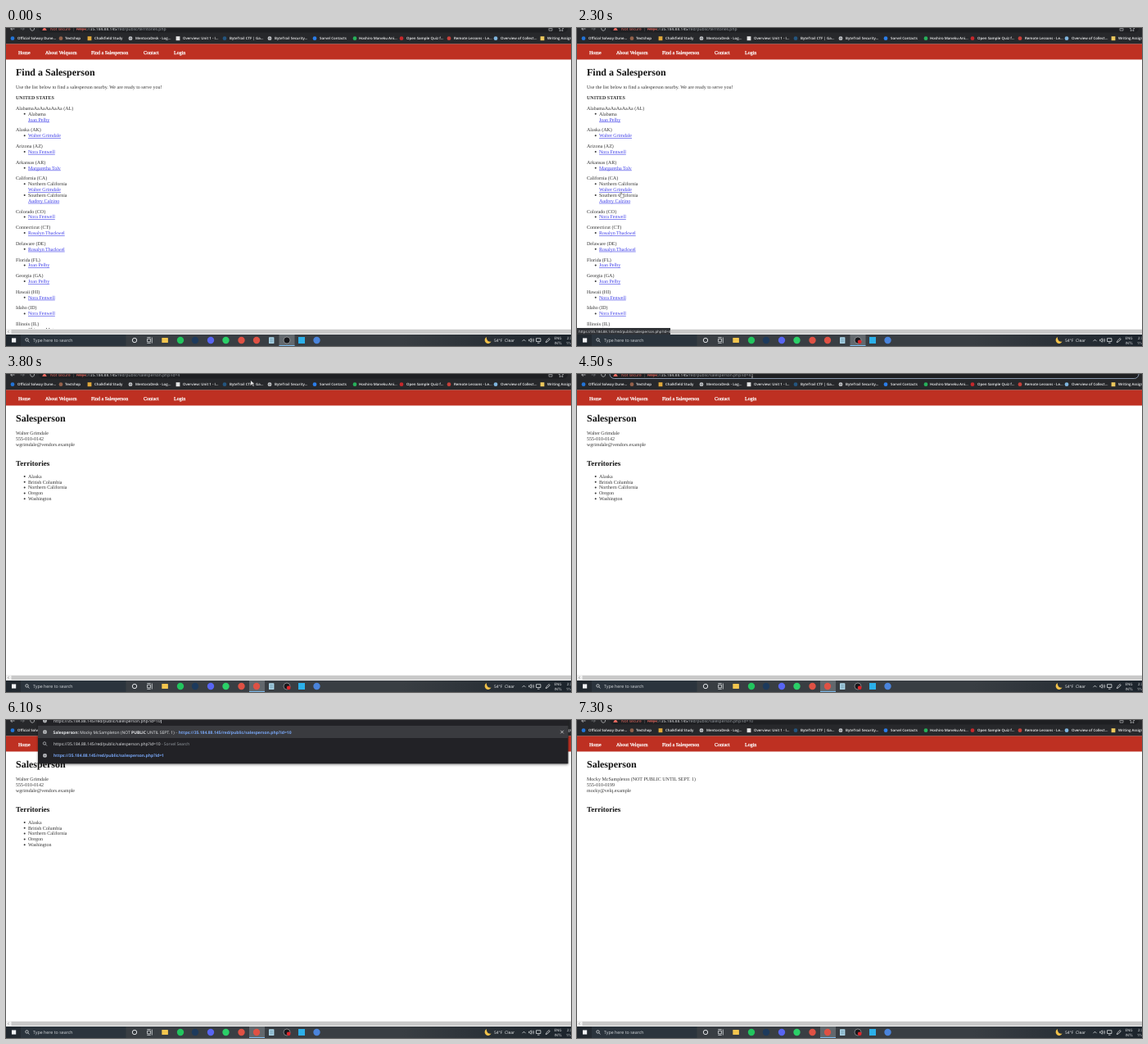
Write an HTML page that moves like this. It is 690 px wide and 388 px high and loops after 8 s.

```html
<!DOCTYPE html>
<html lang="en">
<head>
<meta charset="utf-8">
<title>Browser session</title>
<style>
html, body { margin: 0; width: 100%; height: 100%; overflow: hidden; background: #fff; }
svg { display: block; width: 690px; height: 388px; }
text { font-family: "Open Sans", "Noto Sans", sans-serif; white-space: pre; text-rendering: geometricPrecision; }
.serif text { font-family: "Liberation Serif", "Times New Roman", serif; }
.link { fill: #3c3ce8; text-decoration: underline; text-decoration-thickness: 0.4px; }
.b { font-weight: 700; }
.m { font-weight: 600; }
</style>
</head>
<body>
<svg id="stage" viewBox="0 0 690 388" xmlns="http://www.w3.org/2000/svg"></svg>
<script>
const LOOP = 8000, STEP = 100;
const BASE = '35.184.88.145', PATH = '/red/public/';

const text = (x, y, s, size, fill, cls = '') =>
  `<text x="${x}" y="${y}" font-size="${size}" fill="${fill}" class="${cls}">${s}</text>`;
const rect = (x, y, w, h, fill, extra = '') =>
  `<rect x="${x}" y="${y}" width="${w}" height="${h}" fill="${fill}" ${extra}/>`;
const dot = (x, y, r, fill, extra = '') =>
  `<circle cx="${x}" cy="${y}" r="${r}" fill="${fill}" ${extra}/>`;
const line = (d, color, w = 0.7) =>
  `<path d="${d}" fill="none" stroke="${color}" stroke-width="${w}"/>`;
const group = (id, body, extra = '') => `<g id="${id}" ${extra}>${body}</g>`;
const span = (s, fill, cls = '') => `<tspan fill="${fill}" class="${cls}">${s}</tspan>`;
const globe = (x, y) => dot(x, y, 2.4, '#d5d7da') +
  line(`M${x - 2.2} ${y}h4.4M${x} ${y - 2.2}v4.4`, '#4a4c50', 0.5);
const glass = (x, y, c) => dot(x, y, 1.7, 'none', `stroke="${c}" stroke-width=".7"`) +
  line(`M${x + 1.2} ${y + 1.2}l1.8 1.8`, c);

// Web pages
const INK = '#333', LH = 6.83;
const para = (x, y, s, cls) => text(x, y, s, 6, INK, cls);
const item = (y, s) => dot(22.7, y - 1.9, 1, INK) + para(27, y, s);

const JOAN = 'Joan Pelby', WALTER = 'Walter Grimdale', NORA = 'Nora Fenwell',
  ROSALYN = 'Rosalyn Thackwel';
const states = [
  ['AlabamaAaAaAaAaAa (AL)', 'Alabama', JOAN],
  ['Alaska (AK)', WALTER], ['Arizona (AZ)', NORA], ['Arkansas (AR)', 'Margaretha Tolv'],
  ['California (CA)', 'Northern California', WALTER, 'Southern California', 'Audrey Calzino'],
  ['Colorado (CO)', NORA], ['Connecticut (CT)', ROSALYN], ['Delaware (DE)', ROSALYN],
  ['Florida (FL)', JOAN], ['Georgia (GA)', JOAN], ['Hawaii (HI)', NORA], ['Idaho (ID)', NORA],
  ['Illinois (IL)', 'Chicago Metro', NORA]
];

function territories() {
  let y = 99.9;
  let out = text(12, 58, 'Find a Salesperson', 12, '#111', 'b') +
    para(12, 74.2, 'Use the list below to find a salesperson nearby. We are ready to serve you!') +
    para(12, 87, 'UNITED STATES', 'b');
  for (const [name, ...rows] of states) {
    out += para(12, y, name);
    rows.forEach((row, i) => {
      y += LH;
      const isLink = rows.length === 1 || i % 2 === 1;
      if (i % 2 === 0) out += dot(22.7, y - 1.9, 1, INK);
      out += para(27, y, row, isLink ? 'link' : '');
    });
    y += LH + 6;
  }
  return out;
}

const person = (lines, areas) =>
  text(12, 58, 'Salesperson', 12, '#111', 'b') +
  lines.map((s, i) => para(12, 74.2 + i * LH, s)).join('') +
  text(12, 111.7, 'Territories', 9, '#111', 'b') +
  areas.map((s, i) => item(126.8 + i * LH, s)).join('');

const nav = rect(0, 19.3, 690, 19.2, '#be3022') +
  [[15, 'Home'], [48, 'About Velquorn'], [104, 'Find a Salesperson'], [168, 'Contact'], [205, 'Login']]
    .map(([x, s]) => `<g stroke="#fff" stroke-width=".25">${text(x, 31.8, s, 6, '#fff')}</g>`).join('');

const scrollbar = rect(0, 367, 690, 7, '#f1f1f1') + rect(6.5, 368, 684, 5, '#c9c9c9') +
  line('M3.8 369l-1.6 1.5l1.6 1.5', '#777', 0.6);

const status = rect(0, 366, 114, 8, '#303236') +
  text(2, 371.6, `https://${BASE}${PATH}salesperson.php?id=4`, 4.4, '#e4e6e9');

// Browser frame
const bookmarks = [
  [8, '#2274d8', 14, 'Official Solway Dune...'], [67, '#94604a', 72, 'Textshop'],
  [102, '#e0a83a', 108, 'Chalkfield Study', 1], [152, 'globe', 158, 'MentoraDesk - Log...'],
  [210, '#e4e4e4', 216, 'Overview: Unit 1 - I...', 1], [267, '#24557f', 273, 'ByteTrail CTF | Ga...'],
  [322, 'globe', 328, 'ByteTrail Security...'], [377, '#2b7de9', 383, 'Sorvel Contacts'],
  [426, '#27b05a', 431, 'Hoshiro Maneku Ani...'], [483, '#c5282c', 489, 'Open Sample Quiz f...'],
  [541, '#c8403a', 547, 'Remote Lessons - Le...'], [598, '#7fb4de', 604, 'Overview of Collect...'],
  [655, '#ecc75c', 661, 'Writing Assignments', 1]
];
const mark = ([x, c, tx, s, square]) =>
  (c === 'globe' ? globe(x, 12.7) : square ? rect(x - 2.4, 10.2, 4.8, 5, c) : dot(x, 12.7, 2.4, c)) +
  text(tx, 14.3, s, 4.4, '#f4f5f6', 'm');

const browser = rect(0, 0, 690, 19.3, '#27282b') + rect(40, -6, 646, 11.5, '#1e1f22', 'rx="5.5"') +
  line('M10.5 1h-4.8m2-2l-2 2l2 2', '#d4d6d9') + line('M17.5 1h4.8m-2-2l2 2l-2 2', '#77797d') +
  line('M34.4 0a2.4 2.4 0 1 1-1-1.2', '#d4d6d9') +
  bookmarks.map(mark).join('');

const pageTools = line('M663 3.2v-3h4v3zM665 1.5v-4', '#c4c6c9', 0.6) +
  '<path d="M678 -2l.9 2.1l2.2.2l-1.7 1.4l.6 2.2l-2-1.2l-2 1.2l.6-2.2l-1.7-1.4l2.2-.2z" fill="none" stroke="#c4c6c9" stroke-width=".6"/>';
const addressBar =
  '<path d="M47 -2l2.8 5h-5.6z" fill="#e6695f"/>' +
  text(54, 2.8, 'Not secure', 4.9, '#e6695f') + text(81.5, 2.8, '|', 4.9, '#77797d') +
  `<text id="url" x="86" y="2.8" font-size="4.95"></text>` +
  group('tools', pageTools) +
  rect(40, -6, 646, 11.5, 'none', 'id="ring" rx="5.5" stroke="#b4c8e6" stroke-width=".7"');

const full = id => `https://${BASE}${PATH}salesperson.php?id=${id}`;
const BLUE = '#78a6f5', PALE = '#e8eaed';
const dropdown = rect(39, -4, 647.5, 57.3, '#212226', 'filter="url(#shade)"') +
  rect(39, 7, 647.5, 15, '#3a3b3f') +
  globe(47.5, 1) + `<text id="typed" x="58" y="2.8" font-size="5" fill="${PALE}"></text>` +
  rect(189.2, -1, 0.6, 5, PALE, 'id="caret"') +
  globe(47.5, 14.7) +
  text(57.5, 16.5, span('Salesperson:', PALE, 'b') + ' Mocky McSampleton (NOT ' + span('PUBLIC', PALE, 'b') +
    ' UNTIL SEPT. 1)' + span(' – ', '#9aa0a6') + span(full(10), BLUE, 'b'), 5, PALE) +
  line('M677.3 12.8l3.6 3.6m0-3.6l-3.6 3.6', PALE) +
  glass(47, 28.5, '#c8cacd') +
  text(58, 30.9, `<tspan id="query"></tspan>` + span(' - Sorvel Search', '#9aa0a6'), 5, PALE) +
  globe(47.5, 43.4) + text(58, 45.2, full(1), 5, BLUE, 'b');

// Taskbar
const apps = [
  [213, '#22c55e'], [231, '#1d3a5c'], [250, '#5865f2'], [268.5, '#2bd068'],
  [287.5, '#df5144'], [306, '#df5144'], [361, '#2bb0ea', 1], [379.5, '#4a84dc']
];
const W = '#f0f2f4';
const cell = (id, x) => group(id, rect(x - 9.5, 374, 19, 14, '#62686d') + rect(x - 9.5, 387, 19, 1, '#7ab8ea'));
const taskbar = rect(0, 374, 690, 14, 'url(#bar)') + rect(18, 374, 128.5, 14, '#2b343d') +
  rect(7, 378.4, 5.2, 5.2, W) + glass(25.5, 380.4, W) +
  text(33, 383, 'Type here to search', 5.3, '#d3d7db') +
  cell('recCell', 343) + cell('webCell', 306.5) +
  dot(157, 381, 2.7, 'none', `stroke="${W}" stroke-width=".9"`) +
  line('M172.5 379.3h4v3.5h-4zM172.3 377.6h4.4M172.3 384.4h4.4M178.3 377.5v7', W) +
  rect(190.3, 378, 7.6, 6, '#f3c64e', 'rx=".6"') +
  apps.map(([x, c, sq]) => sq ? rect(x - 4, 377, 8, 8, c) : dot(x, 381, 4.2, c)).join('') +
  rect(321, 377.3, 6.4, 7.6, '#a9d3e6', 'rx=".5"') + line('M322.3 379.5h3.8m-3.8 1.7h3.8m-3.8 1.7h3.8', '#4d7488', 0.5) +
  dot(343, 381, 4, '#17181c', 'stroke="#d5d7d9" stroke-width=".5"') +
  dot(345.2, 382.8, 2.4, '#e0262b', 'id="rec"') +
  '<path d="M587 377a4.2 4.2 0 1 0 5.6 5.6a4.6 4.6 0 0 1-5.6-5.6z" fill="#f2c14a"/>' +
  text(596, 383, '54°F', 4.9, W) + text(609, 383, 'Clear', 5, W) +
  line('M630.5 382.2l2-2l2 2', W) +
  line('M638.5 380.2h1.2l1.6-1.5v4.6l-1.6-1.5h-1.2zM642.6 379.6q1 1.4 0 2.8M643.9 378.7q1.7 2.3 0 4.6', W, 0.6) +
  line('M647.5 378.7h5.4v3.8h-5.4zM649 384.2h2.6', W) +
  line('M659.3 383.6l.6-1.9l3.2-3.2l1.2 1.2l-3.2 3.2z', W) +
  text(669.5, 379.8, 'ENG', 4.4, W) + text(669.5, 386.2, 'INTL', 4.4, W) +
  text(685, 379.8, '2:36 PM', 4.4, W) + text(684, 386.2, '11/14', 4.4, W);

// Pointers, each with its hot spot at 0,0
const pointers =
  group('arrow', '<path d="M0 0v5.6l1.3-1.2l.9 2l.8-.4l-.9-2h1.8z" fill="#fff" stroke="#666" stroke-width=".5"/>') +
  group('hand', '<path d="M-.6.5q.6-.8 1.2 0v2.2l2.4.7q.6.3.5 1l-.5 2.6h-3.4l-2-2.6q.2-1 1.8.2z" fill="#fff" stroke="#444" stroke-width=".5"/>') +
  group('beam', line('M-1-3h2M0-3v6M-1 3h2', '#ddd', 0.6));

const barStops = [[0, '#20272e'], [0.2, '#393e43'], [0.7, '#393e43'], [1, '#1c242c']];
const $ = id => document.getElementById(id);
$('stage').innerHTML =
  '<defs><filter id="shade" x="-5%" y="-20%" width="110%" height="150%">' +
  '<feDropShadow dx="0" dy="1.2" stdDeviation="1.6" flood-opacity=".45"/></filter>' +
  '<linearGradient id="bar">' +
  barStops.map(([at, c]) => `<stop offset="${at}" stop-color="${c}"/>`).join('') +
  '</linearGradient></defs>' +
  rect(0, 0, 690, 388, '#fff') +
  '<g class="serif">' + nav + group('list', territories()) +
  group('walter', person([WALTER, '555-010-0142', 'wgrimdale@vendors.example'],
    ['Alaska', 'British Columbia', 'Northern California', 'Oregon', 'Washington'])) +
  group('mocky', person(['Mocky McSampleton (NOT PUBLIC UNTIL SEPT. 1)', '555-010-0199', 'mocky@velq.example'], [])) +
  '</g>' + scrollbar + group('status', status) +
  browser + group('address', addressBar) +
  rect(210, -1, 3.8, 5, '#b9cdee', 'id="pick" opacity=".85"') +
  group('drop', dropdown) + taskbar + group('pointer', pointers);

// Pointer path: time, x, y
const path = [
  [0, 720, 318], [200, 690, 309], [500, 547, 267], [1000, 120, 140], [1200, 102, 132],
  [1400, 102, 132], [1800, 58, 197], [2200, 54, 200], [3100, 54, 200],
  [3700, 299, 8], [3800, 299, 8], [4200, 214, 1], [LOOP, 214, 1]
];
function pointerAt(t) {
  const i = path.findIndex(p => p[0] > t);
  const [t0, x0, y0] = path[i - 1], [t1, x1, y1] = path[i];
  const k = (t - t0) / (t1 - t0);
  return [x0 + (x1 - x0) * k, y0 + (y1 - y0) * k];
}

const show = (id, on) => { $(id).style.display = on ? '' : 'none'; };
const between = (t, a, b) => t >= a && t < b;

function draw(t) {
  const onList = t < 2800, second = t >= 7200, typing = between(t, 6000, 7100);
  const focused = between(t, 4500, 6000);
  show('list', onList);
  show('walter', !onList && !second);
  show('mocky', second);
  show('status', between(t, 1800, 2800));
  show('recCell', onList);
  show('webCell', !onList);
  show('rec', t >= 100);
  show('address', !typing);
  show('tools', !focused);
  show('ring', focused);
  show('drop', typing);
  show('caret', between(t, 6100, 6700));
  show('pick', between(t, 4900, 6000));

  const page = onList ? 'territories.php' : 'salesperson.php?id=' + (t < 7100 ? 4 : 10);
  $('url').innerHTML = `<tspan fill="#e6695f" text-decoration="line-through">https</tspan>` +
    span('://', '#9aa0a6') + span(BASE, PALE) + span(PATH + page, '#9aa0a6');
  $('typed').textContent = $('query').textContent = full(t < 6100 ? 1 : 10);

  const [x, y] = pointerAt(t);
  const hand = between(t, 1800, 2900), beam = t >= 4100;
  $('pointer').setAttribute('transform', `translate(${x} ${y})`);
  show('hand', hand);
  show('beam', beam && t < 6000);
  show('arrow', !hand && !beam);
}

const start = performance.now();
function tick() {
  const t = (performance.now() - start) % LOOP;
  draw(Math.floor(t / STEP) * STEP);
  requestAnimationFrame(tick);
}
tick();
</script>
</body>
</html>
```
